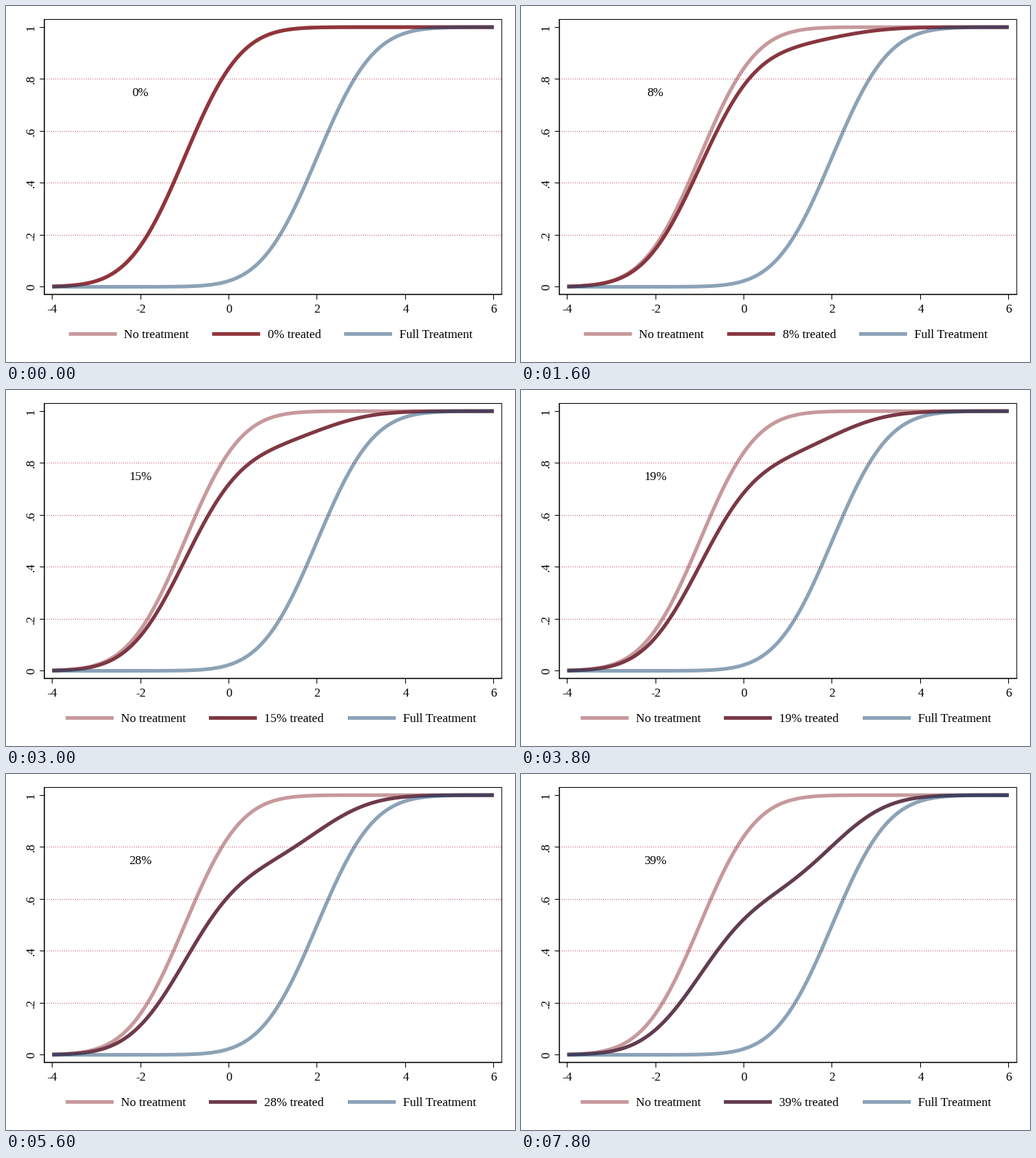
These frames come from a looping animation (700 px wide and 490 px high, 8000 ms). A matplotlib script:

```python
import math

import numpy as np
import matplotlib.pyplot as plt
from matplotlib.animation import FuncAnimation

W, H, DPI = 700, 490, 100
PX = 72 / DPI
FRAMES, INTERVAL = 40, 200

MAROON = np.array([144, 53, 59]) / 255
NAVY = np.array([26, 71, 111]) / 255
GRID = "#d05068"
THICK = 5 * PX
FONT = dict(family="Liberation Serif", size=17 * PX, color="black")

plt.rcParams["path.simplify"] = False
fig = plt.figure(figsize=(W / DPI, H / DPI), dpi=DPI, facecolor="white")
ax = fig.add_axes([0, 0, 1, 1])
ax.set_xlim(0, W)
ax.set_ylim(H, 0)
ax.axis("off")


def px(x):
    return 306.5 + 60.72 * x


def py(y):
    return 386.5 - 357.4 * y


def mid(v):
    """Centre of the pixel that holds v."""
    return math.floor(v) + 0.5


def normal_cdf(x):
    return 0.5 * (1 + np.vectorize(math.erf)(x / math.sqrt(2)))


def line(xs, ys, color, width=PX, alpha=1, z=2, **kw):
    # Snapping would move pixel-centred lines by a whole pixel.
    return ax.plot(xs, ys, color=color, lw=width, alpha=alpha, zorder=z, snap=False,
                   solid_capstyle="butt", dash_capstyle="butt", **kw)[0]


def label(x, y, s, ha="center", **kw):
    return ax.text(x, y, s, ha=ha, va="baseline", **FONT, **kw)


# Frame, grid, axes
LEFT, RIGHT, TOP, BOTTOM = 52.7, 681.8, 18.5, 397

for v in (0.2, 0.4, 0.6, 0.8):
    y = mid(py(v))
    line([53, RIGHT], [y, y], GRID, z=1, dashes=(1, 2))

line([LEFT, RIGHT, RIGHT], [TOP, TOP, BOTTOM], "black")
line([LEFT, LEFT], [TOP - 0.5, BOTTOM + 0.7], "black", 1.5 * PX)
line([LEFT, RIGHT + 0.5], [BOTTOM, BOTTOM], "black", 1.5 * PX)

for i, s in enumerate(["0", ".2", ".4", ".6", ".8", "1"]):
    y = mid(py(i / 5))
    line([46.5, LEFT], [y, y], "black")
    label(39, y, s, rotation=90, rotation_mode="anchor")

for v in range(-4, 7, 2):
    x = mid(px(v))
    line([x, x], [BOTTOM, 404], "black")
    label(x, 422, str(v))

# Curves
xs = np.linspace(-4, 6, 400)
untreated = normal_cdf(xs + 1)
treated = normal_cdf(xs - 2)

line(px(xs), py(untreated), MAROON, THICK, alpha=0.5, z=3)
mix = line(px(xs), py(untreated), MAROON, THICK, z=4)
line(px(xs), py(treated), NAVY, THICK, alpha=0.5, z=5)
share = label(185, 124, "0%")

# Legend
styles = [(MAROON, 0.5, "No treatment"), (MAROON, 1, ""), (NAVY, 0.5, "Full Treatment")]
keys = [line([0, 1], [451.4, 451.4], c, THICK, alpha=a) for c, a, _ in styles]
names = [label(0, 457, s, ha="left") for _, _, s in styles]


def update(i):
    p = i / 100
    color = (1 - p) * MAROON + p * NAVY
    mix.set_ydata(py((1 - p) * untreated + p * treated))
    mix.set_color(color)
    keys[1].set_color(color)
    share.set_text(f"{i}%")
    names[1].set_text(f"{i}% treated")
    starts = (86.5, 283.5, 465) if i < 10 else (82, 279, 470)
    for x, key, name in zip(starts, keys, names):
        key.set_xdata([x, x + 66])
        name.set_x(x + 76)
    return [mix, share, *keys, *names]


anim = FuncAnimation(fig, update, frames=FRAMES, interval=INTERVAL,
                     init_func=lambda: update(0), repeat=True, repeat_delay=0)
plt.show()
```
